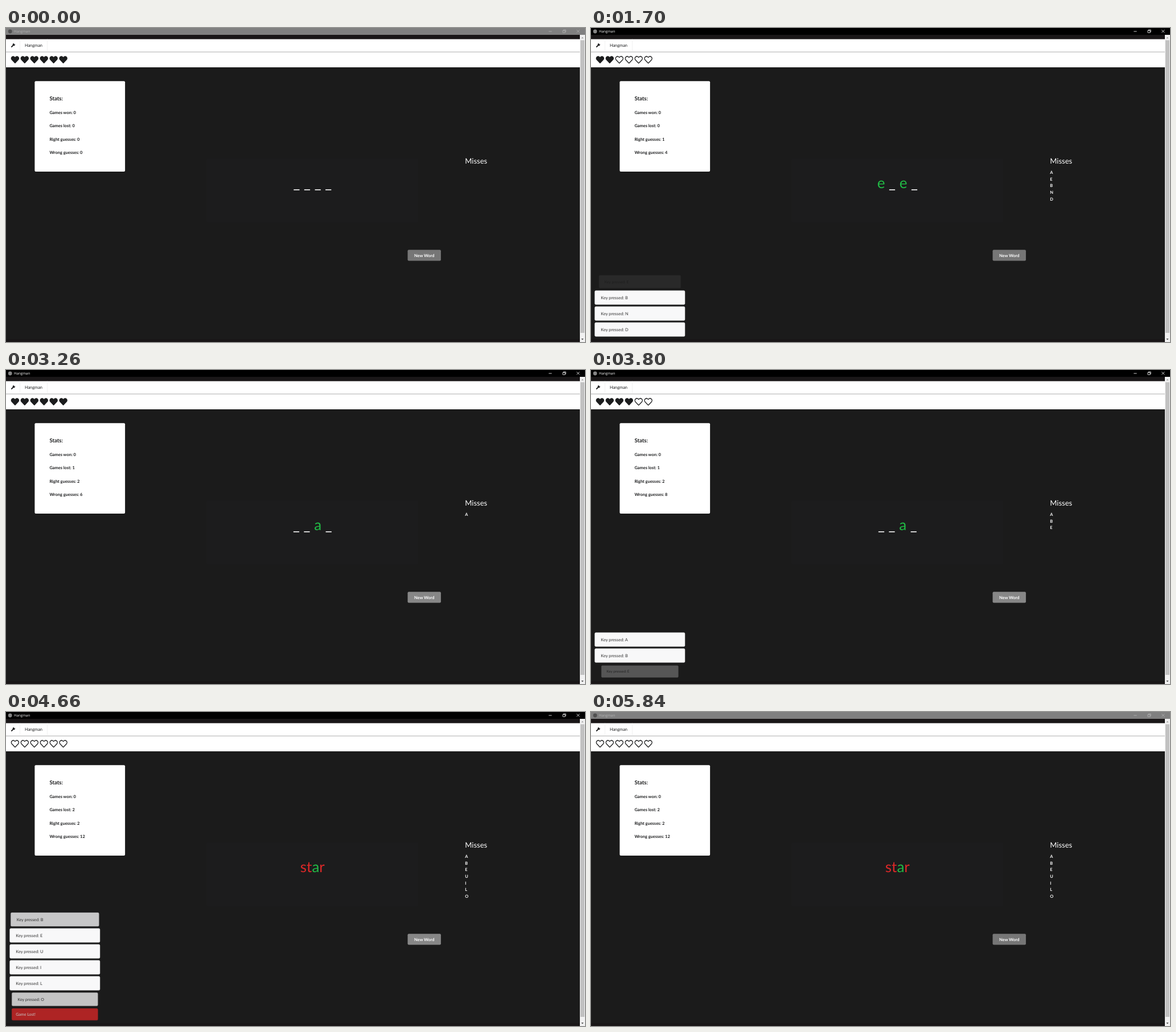
An HTML page for the animation above (6.16 s loop, 1017x551 px).

```html
<!DOCTYPE html>
<html lang="en">
<head>
<meta charset="utf-8">
<title>Hangman</title>
<style>
  html, body { margin: 0; width: 100%; height: 100%; overflow: hidden; background: #1b1b1b; }
  svg { display: block; width: 100vw; height: 100vh; }
  text { font: 7.42px Lato, sans-serif; text-rendering: geometricPrecision; }
  .bold { font-weight: 700; }
  .win { font: 6.2px "Open Sans", sans-serif; }
</style>
</head>
<body>
<svg id="stage" viewBox="0 0 1017 551" preserveAspectRatio="none">
  <defs>
    <path id="heart" d="M462 63C407 16 326 24 276 76L256 97L236 76C186 24 105 16 50 63C-13 116 -16 212 40 270L233 470C246 483 266 483 279 470L472 270C528 212 525 116 462 63Z"/>
  </defs>
  <rect width="1017" height="551" fill="#1b1b1b"/>
  <rect y="12" width="1008" height="7.6" fill="#191617"/>
  <rect y="546" width="1008" height="5" fill="#191617"/>
  <rect y="19.6" width="1008" height="49.4" fill="#fff"/>
  <rect y="41.6" width="1008" height=".9" fill="#a4a4a4"/>
  <path d="M24.5 19.6V41.6M72.5 19.6V41.6" stroke="#ececec" stroke-width=".7"/>
  <g fill="#1b1c1d">
    <path d="M9.9 33L13.2 29.7" stroke="#1b1c1d" stroke-width="1.8" stroke-linecap="round"/>
    <circle cx="13.8" cy="29.1" r="2.2"/>
    <path d="M14.3 28.6L16.6 26.3" stroke="#fff" stroke-width="1.4"/>
    <text x="32.9" y="33.3">Hangman</text>
  </g>
  <rect x="50.4" y="93.3" width="158.7" height="158.7" rx="2" fill="#fff"/>
  <text class="bold" x="76.4" y="127" fill="#1b1c1d" style="font-size:9.5px">Stats:</text>
  <rect x="352" y="229" width="372" height="112" rx="2" fill="#1c1c1d"/>
  <text x="806.3" y="238" fill="#fff" style="font-size:13px">Misses</text>
  <rect x="1008" y="12" width="9" height="539" fill="#f1f1f1"/>
  <rect x="1009" y="21.5" width="7" height="513.5" fill="#c1c1c1"/>
  <path d="M1010.4 18.2L1012.5 15.8L1014.6 18.2Z" fill="#a3a3a3"/>
  <path d="M1010.4 545L1012.5 547.4L1014.6 545Z" fill="#505050"/>
  <g id="live"></g>
</svg>
<script>
const LOOP = 6160, STEP = 20, IN = 170, OUT = 160;
const ROW = 25, LOST_ROW = 22, GAP = 3, FLOOR = 541.6;
const live = document.getElementById('live');

// Each guess: letter, time pressed, time its toast starts to leave.
const games = [
  { word: 'eyes', start: 0, guesses: [
    ['A', 320, 1320], ['E', 560, 1550], ['B', 880, 1880], ['N', 1320, 2320],
    ['D', 1500, 2500], ['O', 1780, 2800], ['L', 1940, 2940]] },
  { word: 'star', start: 2900, guesses: [
    ['A', 3260, 4300], ['B', 3560, 4625], ['E', 3755, 4825], ['U', 3960, 4980],
    ['I', 4300, 5340], ['L', 4410, 5440], ['O', 4530, 5560]] }
];
const isHit = (game, key) => game.word.includes(key.toLowerCase());

const toasts = games.flatMap(game => {
  const list = game.guesses.map(([key, from, to]) => ({ text: 'Key pressed: ' + key, from, to }));
  const last = list[list.length - 1];
  return [...list, { text: 'Game Lost!', from: last.from, to: last.to, lost: true }];
});

const text = (x, y, str, fill, attrs = '') =>
  `<text x="${x}" y="${y}" fill="${fill}" ${attrs}>${str}</text>`;

function titleBar(active) {
  const ink = active ? '#fff' : '#b4b4b4';
  return `<rect width="1017" height="12" fill="${active ? '#000' : '#808080'}"/>
    <circle cx="7.2" cy="6" r="3.4" fill="${active ? '#858585' : '#505050'}"/>
    ${text(14, 8.4, 'Hangman', ink, 'class="win"')}
    <path d="M953.3 6H958.6M978 4.4H982V8.2H978ZM979.2 4.4V3.2H983.2V7H982M1002.4 3.2L1007.4 8.2M1007.4 3.2L1002.4 8.2"
      fill="none" stroke="${ink}" stroke-width=".8"/>`;
}

function hearts(left) {
  let out = '';
  for (let i = 0; i < 6; i++) {
    const full = i < left;
    const scale = full ? 0.0283 : 0.0257;
    const paint = full ? 'fill="#1b1c1d"' : 'fill="none" stroke="#1b1c1d" stroke-width="50"';
    out += `<use href="#heart" ${paint}
      transform="translate(${15.9 + i * 16.94} 55.7) scale(${scale}) translate(-256 -256)"/>`;
  }
  return out;
}

function wordText(game, keys, lost) {
  const cells = [...game.word].map(ch => {
    const found = keys.includes(ch.toUpperCase());
    if (!found && !lost) return '<tspan>_</tspan>';
    return `<tspan fill="${found ? '#21ba45' : '#db2828'}">${ch}</tspan>`;
  });
  return text(538.3, 281, cells.join(lost ? '' : ' '), '#fff',
    'text-anchor="middle" style="font-size:26px"');
}

function toastStack(t) {
  let bottom = FLOOR, out = '';
  const shown = toasts.filter(q => t >= q.from && t < q.to + OUT).reverse();
  for (const { text: label, from, to, lost } of shown) {
    const h = lost ? LOST_ROW : ROW;
    const enter = Math.min(1, (t - from) / IN);
    const leave = Math.max(0, (t - to) / OUT);
    const scale = 0.8 + 0.2 * enter - 0.1 * leave;
    const mid = bottom - h / 2;
    out += `<g opacity="${enter * (1 - leave)}"
      transform="translate(85.8 ${mid}) scale(${scale}) translate(-85.8 ${-mid})">
      <rect x="6.6" y="${bottom - h + .25}" width="158.4" height="${h - .5}" rx="2"
        fill="${lost ? '#db2828' : '#f8f8f9'}" stroke="${lost ? '#db2828' : '#c9cacb'}" stroke-width=".5"/>
      ${text(lost ? 13.8 : 17.3, mid + 2.7, label, lost ? '#fff' : '#333')}</g>`;
    bottom -= h + GAP;
  }
  return out;
}

function draw(t) {
  const game = t < games[1].start ? games[0] : games[1];
  const made = g => g.guesses.filter(q => t >= q[1]).map(q => q[0]);
  const keys = made(game);
  const misses = g => made(g).filter(k => !isHit(g, k)).length;
  const total = count => games.reduce((sum, g) => sum + count(g), 0);
  const left = 6 - misses(game);
  const wrong = total(misses);
  const right = total(g => made(g).length) - wrong;
  const stats = ['Games won: 0', 'Games lost: ' + total(g => +(misses(g) === 6)),
    'Right guesses: ' + right, 'Wrong guesses: ' + wrong];
  const hover = t >= 2840 && t < 5780;

  live.innerHTML = titleBar(t >= 20 && t < 5840) + hearts(left) +
    stats.map((s, i) => text(76.4, 151 + i * 23.33, s, '#1b1c1d', 'class="bold"')).join('') +
    wordText(game, keys, left === 0) +
    keys.map((k, i) => text(806.3, 255.9 + i * 11.66, k, '#fff', 'class="bold"')).join('') +
    `<rect x="705.5" y="389.3" width="58.4" height="19.2" rx="2" fill="${hover ? '#878787' : '#767676'}"/>` +
    text(734.7, 401.6, 'New Word', '#fff', 'class="bold" text-anchor="middle"') +
    toastStack(t);
}

const start = performance.now();
let shown = -1;
function tick() {
  let t = Math.floor((performance.now() - start) % LOOP / STEP) * STEP;
  if (t > 1700 && t < 1780) t = 1700; // short stall
  if (t !== shown) draw(shown = t);
  requestAnimationFrame(tick);
}
tick();
</script>
</body>
</html>
```
